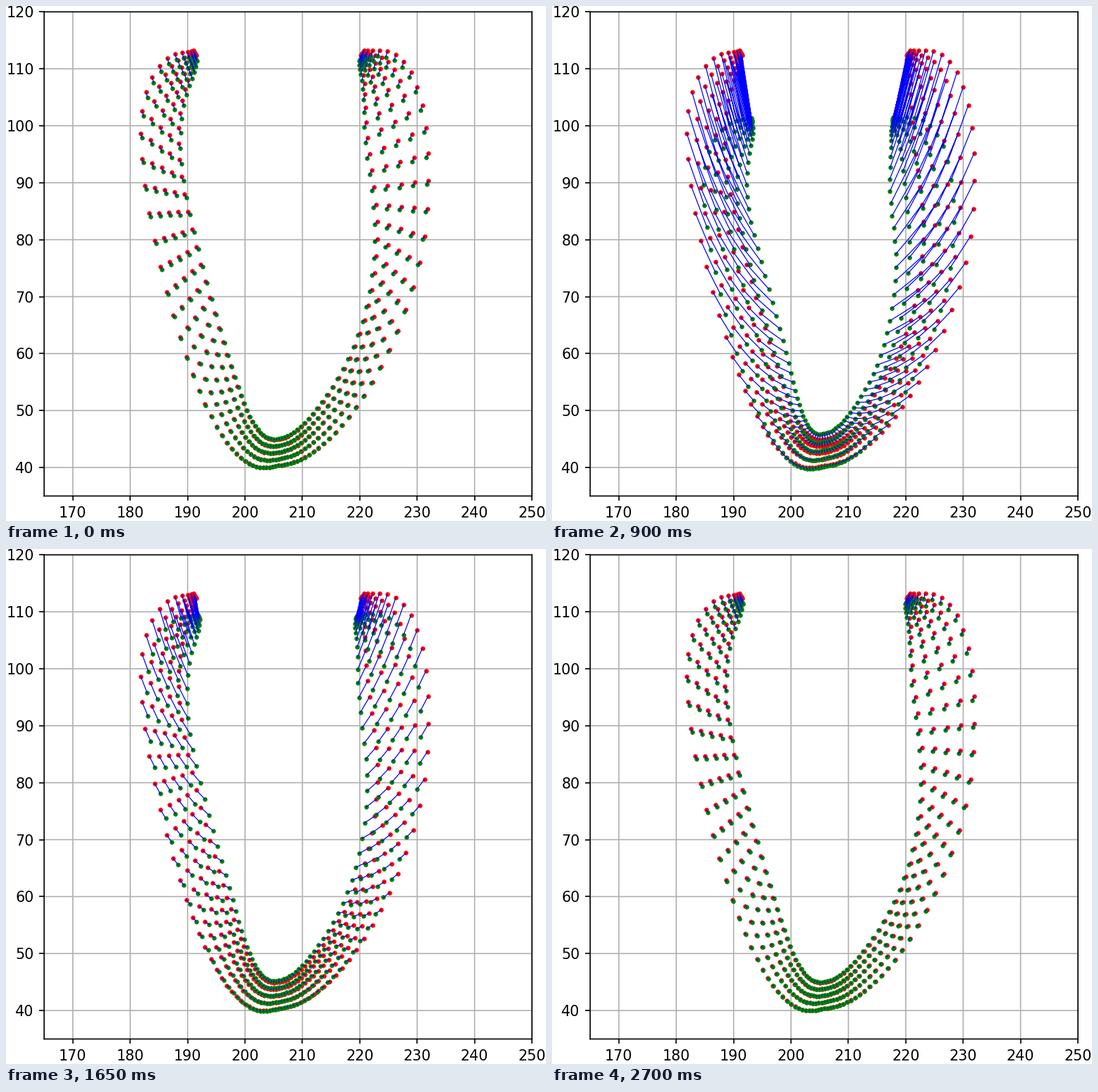
A matplotlib script for the animation above (2.85 s loop, 766 by 731 pixels).

```python
import numpy as np
import matplotlib.pyplot as plt
from matplotlib.animation import FuncAnimation

plt.rcParams["path.snap"] = False

W, H, DPI = 766, 731, 148.8
LEFT, TOP, WIDTH, HEIGHT = 54.1, 8.3, 692, 687.2
XLIM, YLIM = (165, 250), (35, 120)
FRAMES, COUNT, LAYERS = 19, 81, 5
APEX = COUNT // 2

# Key points of the wall at rest, rim to apex to rim: outer x, y, inner x, y
KEY_STEPS = np.array([0, 2, 5, 9, 14, 20, 28])
KEY_NODES = np.r_[KEY_STEPS, APEX, COUNT - 1 - KEY_STEPS[::-1]]
KEY_POINTS = np.array([
    (266, 63.5, 269.5, 70), (257.5, 65, 265.5, 86), (229, 74, 253.5, 118),
    (193, 149, 244.5, 195), (211, 333, 263.5, 317), (265, 523.5, 302, 457),
    (327, 635.5, 341, 574),
    (386.5, 652.3, 387.5, 615),
    (451, 621, 449.5, 562), (531.5, 512.5, 508.5, 446), (593.5, 327, 526.5, 306),
    (590.5, 141, 513, 187), (553, 69, 508.5, 110), (520, 63.5, 504, 82),
    (508, 63, 503, 70),
])
# Sideways pull of the contracted wall at evenly spread nodes: outer, inner
SIDE_NODES = np.array([0, 8, 16, 24, 39, 56, 64, 72, 80])
SIDE_PULL = np.array([
    (15, 13), (22, 28.5), (16.5, 28.5), (8, 17), (0, 0),
    (-12, -22), (-24.5, -35), (-26, -29), (-22, -18),
])


def spline(knots, values, at):
    """Natural cubic spline through the rows of values."""
    h = np.diff(knots)
    slope = np.diff(values, axis=0) / h[:, None]
    n = len(knots)
    system, rhs = np.eye(n), np.zeros(values.shape)
    for k in range(1, n - 1):
        system[k, k - 1:k + 2] = h[k - 1], 2 * (h[k - 1] + h[k]), h[k]
        rhs[k] = 6 * (slope[k] - slope[k - 1])
    m = np.linalg.solve(system, rhs)
    k = np.clip(np.searchsorted(knots, at, side="right") - 1, 0, n - 2)
    t, step = (at - knots[k])[:, None], h[k][:, None]
    return (values[k] + t * (slope[k] - step * (2 * m[k] + m[k + 1]) / 6)
            + t**2 * m[k] / 2 + t**3 * (m[k + 1] - m[k]) / (6 * step))


def fill_layers(outer, inner):
    depth = np.linspace(0, 1, LAYERS)[:, None, None]
    return (outer * (1 - depth) + inner * depth).reshape(-1, 2)


def ease(frame, start, end):
    u = np.clip((frame - start) / (end - start), 0, 1)
    return u * u * (3 - 2 * u)


def contraction(frame):
    """Inward and downward share of the pull: squeeze, release, late filling."""
    squeeze, late = 0.1 + 1.06 * ease(frame, 0, 5.3), ease(frame, 14, 18.5)
    inward = squeeze - 0.88 * ease(frame, 4.8, 13) - 0.19 * late
    downward = squeeze - 0.795 * ease(frame, 6.2, 9.8) - 0.28 * late
    return inward, downward


nodes = np.arange(COUNT)
from_rim = np.minimum(nodes, COUNT - 1 - nodes)
edges = spline(KEY_NODES, KEY_POINTS, nodes)
side = spline(SIDE_NODES, SIDE_PULL, nodes)
drop_outer = 82 / (1 + (from_rim / 13.6) ** 4)
drop_inner = 94 / (1 + (from_rim / 15) ** 3) - 12

scale = np.array([(XLIM[1] - XLIM[0]) / WIDTH, (YLIM[0] - YLIM[1]) / HEIGHT])
rest = (fill_layers(edges[:, :2], edges[:, 2:]) - (LEFT, TOP)) * scale
rest += XLIM[0], YLIM[1]
pull = scale * fill_layers(np.c_[side[:, 0], drop_outer],
                           np.c_[side[:, 1], drop_inner])

fig = plt.figure(figsize=((W + 1e-6) / DPI, (H + 1e-6) / DPI), dpi=DPI,
                 facecolor="white")
ax = fig.add_axes([LEFT / W, 1 - (TOP + HEIGHT) / H, WIDTH / W, HEIGHT / H])
ax.set(xlim=XLIM, ylim=YLIM, xticks=range(170, 251, 10), yticks=range(40, 121, 10))
ax.grid(True)

dots = dict(linestyle="none", marker="o", markersize=3.15, markeredgewidth=0)
ax.plot(*rest.T, color="red", **dots)
moved_dots, = ax.plot([], [], color="green", **dots)
links, = ax.plot([], [], color="blue", linewidth=0.6)


def draw(frame):
    moved = rest + pull * contraction(frame)
    moved_dots.set_data(*moved.T)
    gap = np.full_like(rest, np.nan)
    links.set_data(*np.stack([rest, moved, gap], axis=1).reshape(-1, 2).T)
    return moved_dots, links


anim = FuncAnimation(fig, draw, frames=FRAMES, interval=150,
                     repeat=True, repeat_delay=0)
plt.show()
```
